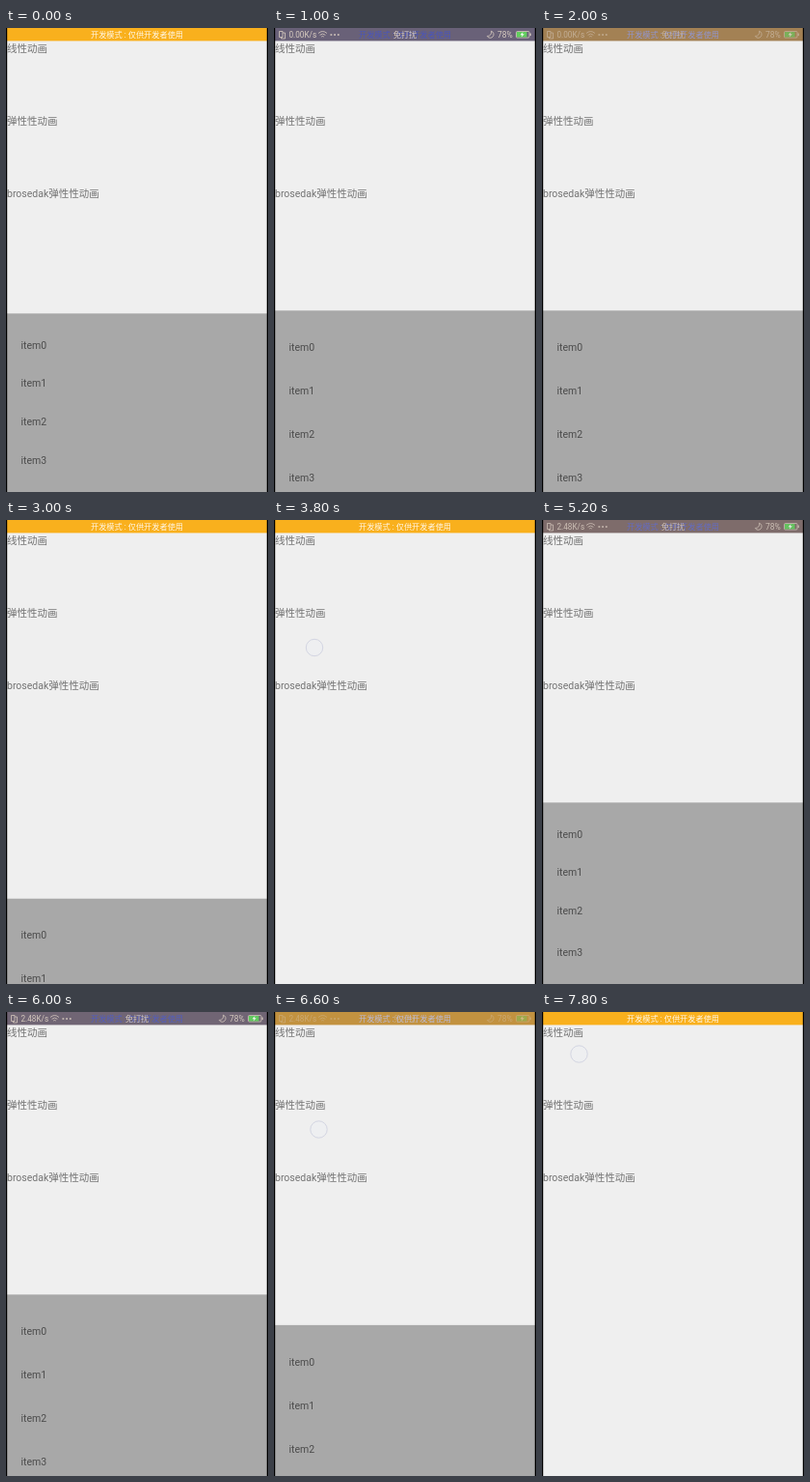
Write an HTML page that moves like this. It is 272 by 480 pixels and loops after 8 s.

```html
<!DOCTYPE html>
<html lang="zh">
<head>
<meta charset="utf-8">
<title>Bottom sheet animations</title>
<style>
  html, body { margin: 0; width: 100%; height: 100%; overflow: hidden; background: #efefef; }
  svg { display: block; width: 100%; height: 100%; }
  text { font: 10.5px Roboto, "Noto Sans CJK SC", "Noto Sans CJK", sans-serif; white-space: pre; }
  .label { fill: #737373; }
  .item { fill: #4c4c4c; }
  .small { font-size: 8.2px; }
  #status text { fill: #d8ccc0; }
</style>
</head>
<body>
<svg viewBox="0 0 272 480">
  <rect width="272" height="480" fill="#efefef"/>
  <text class="label" x="1" y="25.2">线性动画</text>
  <text class="label" x="1" y="100.2">弹性性动画</text>
  <text class="label" x="1" y="175.2">brosedak弹性性动画</text>

  <g id="sheet"><rect width="272" height="190" fill="#a8a8a8"/></g>
  <circle id="touch" r="8.7" fill="#eeeff1" stroke="#d3d5e2"/>

  <rect id="bar" width="272" height="13.4"/>
  <text id="mode" class="small" x="136" y="10" text-anchor="middle">开发模式 : 仅供开发者使用</text>

  <g id="status">
    <g fill="none" stroke="#d8ccc0" stroke-width=".8">
      <path d="M5.5 3.5h3.5v6h-3.5zM7.5 9.5v1.5h4v-6h-2.5"/>
      <path d="M46 5.5q4.5-4 9 0M47.6 7.3q2.9-2.5 5.8 0M49.2 9q1.3-1 2.6 0"/>
      <path d="M225.5 3.2a3.6 3.6 0 1 1-4.2 5.2a4 4 0 0 0 4.2-5.2z"/>
      <rect x="251.5" y="3.5" width="13.5" height="6.5" rx="1"/>
    </g>
    <path d="M58.5 6.3h1.8v1.4h-1.8zM62.2 6.3h1.8v1.4h-1.8zM65.9 6.3h1.8v1.4h-1.8zM265.5 5.5h1.3v2.5h-1.3z" fill="#d8ccc0"/>
    <rect x="252" y="4" width="10.5" height="5.5" fill="#62cf5e"/>
    <path d="M258.6 4l-3 3.2h2l-.8 2.3 3-3.2h-2z" fill="#fff"/>
    <text id="speed" class="small" x="15.5" y="10"></text>
    <text class="small" x="136" y="10" text-anchor="middle">免打扰</text>
    <text x="232" y="10" style="font-size:8.5px">78%</text>
  </g>

  <path d="M.6 0V480M271.4 0V480" stroke="#000" stroke-width="1.2"/>
</svg>
<script>
const LOOP = 8000, STEP = 200;
const OPEN_Y = 292.3, CLOSED_Y = 480, SLIDE_MS = 400;
const ITEM_GAP = 45, ITEM_RISE = 150;

const runs = [
  { open: -364, items: [-300, -300, -300, -320], close: 2794, fadeIn: [150, 850], fadeOut: [1700, 2450], speed: "0.00K/s" },
  { open: 4150, items: [4900, 4900, 4900, 4935], close: 6484, fadeIn: [4600, 5300], fadeOut: [5950, 7000], speed: "2.48K/s" }
];
const touches = [
  { x: 100, y: 219, from: 2500, to: 2800 },
  { x: 42, y: 132, from: 3700, to: 4200 },
  { x: 46.5, y: 121.5, from: 6300, to: 6800 },
  { x: 38.5, y: 43.5, from: 7550, to: 8000 }
];

const $ = id => document.getElementById(id);
const clamp = v => Math.min(1, Math.max(0, v));
const ramp = (t, from, to) => clamp((t - from) / (to - from));
const easeInOut = u => u < .5 ? 2 * u * u : 1 - 2 * (1 - u) ** 2;
const slide = (t, start) => easeInOut(ramp(t, start, start + SLIDE_MS));
const mix = (a, b, p) => `rgb(${a.map((v, i) => Math.round(v + (b[i] - v) * p))})`;

// Remaining distance of an underdamped spring, from 1 to 0.
function spring(ms) {
  if (ms <= 0) return 1;
  const t = ms / 1000, decay = 11, freq = 10.45;
  return Math.exp(-decay * t) * (Math.cos(freq * t) + decay / freq * Math.sin(freq * t));
}

const items = [0, 1, 2, 3].map(i => {
  const text = document.createElementNS("http://www.w3.org/2000/svg", "text");
  text.textContent = "item" + i;
  text.setAttribute("class", "item");
  text.setAttribute("x", 15.5);
  return $("sheet").appendChild(text);
});

function draw(t) {
  const run = t < 3600 ? runs[0] : runs[1];
  const shown = slide(t, run.open) - slide(t, run.close);
  const top = CLOSED_Y + (OPEN_Y - CLOSED_Y) * shown;
  $("sheet").setAttribute("transform", `translate(0 ${top.toFixed(2)})`);
  items.forEach((item, i) => {
    const offset = ITEM_RISE * (i + 1) * spring(t - run.items[i]);
    item.setAttribute("y", (41.8 + i * ITEM_GAP + offset).toFixed(2));
  });

  const p = ramp(t, ...run.fadeIn) - ramp(t, ...run.fadeOut);
  $("bar").setAttribute("fill", mix([249, 176, 29], [105, 97, 120], p));
  $("mode").setAttribute("fill", mix([255, 246, 228], [74, 85, 186], p));
  $("status").setAttribute("opacity", p);
  $("speed").textContent = run.speed;

  const touch = touches.find(o => t >= o.from && t < o.to);
  $("touch").setAttribute("opacity", touch ? ramp(t, touch.from, touch.from + 100) : 0);
  if (touch) {
    $("touch").setAttribute("cx", touch.x);
    $("touch").setAttribute("cy", touch.y);
  }
}

// The picture advances five times a second.
const start = performance.now();
function tick() {
  const t = (performance.now() - start) % LOOP;
  draw(Math.floor(t / STEP) * STEP);
  requestAnimationFrame(tick);
}
tick();
</script>
</body>
</html>
```
